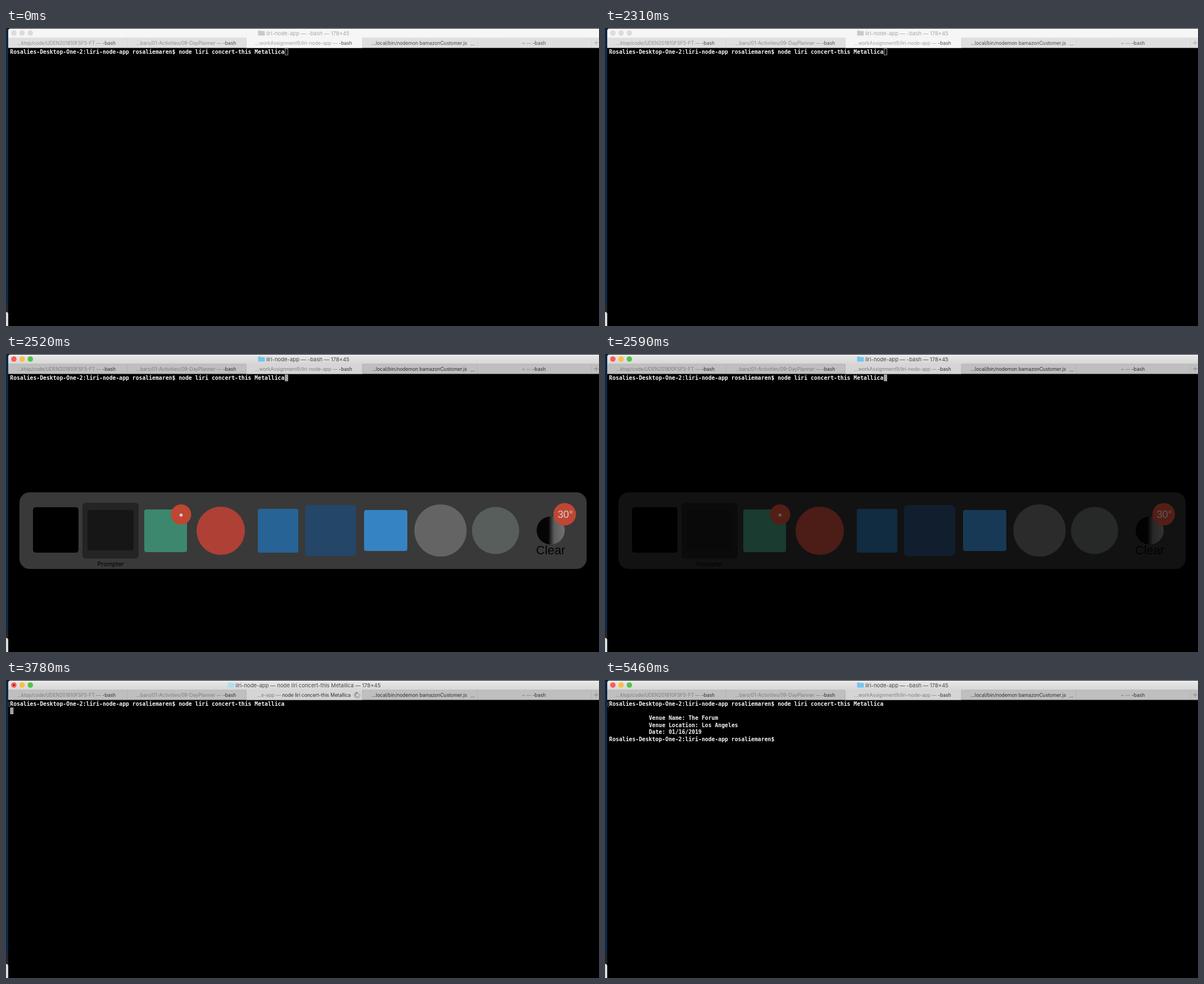
An HTML page for the animation above (5530 ms loop, 1055 by 531 pixels).

```html
<!DOCTYPE html>
<html lang="en">
<head>
<meta charset="utf-8">
<title>Shell session</title>
<style>
html, body { margin: 0; width: 100%; height: 100%; overflow: hidden; background: #000; }
svg { display: block; width: 1055px; height: 531px; }
svg, .panel, .plate, .idle, .typed, .ran, .busy, .calm, .done, .blink, .mark {
  animation: 5530ms step-end infinite;
}

/* window loses grey theme once focused */
svg { animation-name: theme; }
@keyframes theme {
  0%, 100% {
    --top: #f7f7f7; --low: #f5f5f5; --tab: #dfdfdf; --sel: #f6f6f6; --line: #cfcfcf;
    --title: #a6a6a6; --path: #8d8d8d; --dim: #a2a2a2; --name: #4a4a4a;
    --red: #dcdcdc; --amber: #dcdcdc; --green: #dcdcdc; --folder: #c9c9c9;
  }
  45.56% {
    --top: #e9e9e9; --low: #d6d6d6; --tab: #bfbfbf; --sel: #d5d5d5; --line: #a9a9a9;
    --title: #484848; --path: #7c7c7c; --dim: #808080; --name: #2c2c2c;
    --red: #fc5b57; --amber: #fdbd41; --green: #50c546; --folder: #74c5f0;
  }
  67.08% {
    --top: #e9e9e9; --low: #d6d6d6; --tab: #bfbfbf; --sel: #d5d5d5; --line: #a9a9a9;
    --title: #484848; --path: #7c7c7c; --dim: #808080; --name: #2c2c2c;
    --red: #fc5b57; --amber: #fdbd41; --green: #50c546; --folder: #b4dcee;
  }
  73.41% {
    --top: #e9e9e9; --low: #d6d6d6; --tab: #bfbfbf; --sel: #d5d5d5; --line: #a9a9a9;
    --title: #484848; --path: #7c7c7c; --dim: #808080; --name: #2c2c2c;
    --red: #fc5b57; --amber: #fdbd41; --green: #50c546; --folder: #74c5f0;
  }
}

/* app switcher pops in, then fades */
.panel { animation-name: panel; }
@keyframes panel {
  0%, 100% { opacity: 0; }
  44.3% { opacity: 1; }
  45.56% { opacity: .82; }
  46.83% { opacity: .36; }
  48.09% { opacity: .07; }
  49.36% { opacity: 0; }
}
.plate { animation-name: plate; }
@keyframes plate {
  0%, 100% { opacity: 1; }
  45.56% { opacity: .8; }
  46.83% { opacity: .6; }
  48.09% { opacity: 0; }
}

/* shell stages */
.idle { animation-name: idle; }
@keyframes idle { 0% { opacity: 1; } 45.56%, 100% { opacity: 0; } }
.typed { animation-name: typed; }
@keyframes typed { 0%, 100% { opacity: 0; } 45.56% { opacity: 1; } 58.22% { opacity: 0; } }
.ran { animation-name: ran; }
@keyframes ran { 0%, 100% { opacity: 0; } 58.22% { opacity: 1; } 73.41% { opacity: 0; } }
.mark { animation-name: mark; }
@keyframes mark { 0%, 100% { opacity: 0; } 58.22% { opacity: 1; } }
.busy { animation-name: busy; }
@keyframes busy { 0%, 100% { opacity: 0; } 67.08% { opacity: 1; } 73.41% { opacity: 0; } }
.calm { animation-name: calm; }
@keyframes calm { 0%, 100% { opacity: 1; } 67.08% { opacity: 0; } 73.41% { opacity: 1; } }
.done { animation-name: done; }
@keyframes done { 0%, 100% { opacity: 0; } 73.41% { opacity: 1; } }
.blink { animation-name: blink; }
@keyframes blink { 0%, 100% { opacity: 0; } 73.41% { opacity: 1; } 86.07% { opacity: 0; } }

.spin { transform-origin: 625px 27px; animation: spin 921.667ms steps(12) infinite; }
@keyframes spin { to { transform: rotate(360deg); } }

.top { stop-color: var(--top); }
.low { stop-color: var(--low); }
.title { font: 9.5px Inter, "Liberation Sans", sans-serif; fill: var(--title); }
.tabs { font: 8.5px Inter, "Liberation Sans", sans-serif; fill: var(--path); text-anchor: middle; }
.tabs .dim { fill: var(--dim); }
.tabs .name { fill: var(--name); }
.shell { font: bold 9.777px "DejaVu Sans Mono", "Liberation Mono", monospace; fill: #f4f4f4; white-space: pre; }
.folder { fill: var(--folder); }
.cursor { fill: #a3a3a3; }
</style>
</head>
<body>
<svg viewBox="0 0 1055 531">
  <defs>
    <linearGradient id="bar" x2="0" y2="1">
      <stop class="top" offset="0"/><stop class="low" offset="1"/>
    </linearGradient>
    <linearGradient id="moon">
      <stop offset=".42" stop-color="#070707"/><stop offset=".62" stop-color="#707070"/><stop offset="1" stop-color="#8c8c8c"/>
    </linearGradient>
    <path id="dir" class="folder" d="M0 1q0-1 1-1h3l1 1h6q1 0 1 1v6q0 1-1 1h-10q-1 0-1-1z"/>
  </defs>

  <!-- screen edge -->
  <rect width="1055" height="531" fill="#15171c"/>
  <rect y="1" width="4" height="489" fill="#0c2747"/>
  <rect y="490" width="4" height="17" fill="#24252c"/>
  <path d="M0 506q4 0 4 4v21h-4z" fill="#d9dcdc"/>
  <rect x="4" y="35" width="1051" height="496"/>

  <!-- title bar -->
  <path d="M4 18v-13q0-4 4-4h1047v17z" fill="url(#bar)"/>
  <circle cx="14" cy="9" r="4.8" style="fill:var(--red)"/>
  <circle cx="28.6" cy="9" r="4.8" style="fill:var(--amber)"/>
  <circle cx="43.3" cy="9" r="4.8" style="fill:var(--green)"/>
  <circle class="busy" cx="14" cy="9" r="1.6" fill="#7d120f"/>
  <g class="title">
    <g class="calm">
      <use href="#dir" x="448.5" y="4.5"/>
      <text x="463" y="12.6">liri-node-app — -bash — 178×45</text>
    </g>
    <g class="busy">
      <use href="#dir" x="394.5" y="4.5"/>
      <text x="408.5" y="12.6">liri-node-app — node liri concert-this Metallica — 178×45</text>
    </g>
  </g>

  <!-- tabs -->
  <rect x="4" y="18" width="1051" height="17.5" style="fill:var(--tab)"/>
  <rect x="427.5" y="18" width="206.5" height="17.5" style="fill:var(--sel)"/>
  <path d="M4 17.75h423.5M634 17.75h421M215.5 18v17M427.5 18v17M634 18v17M838.5 18v17M1041.5 18v17" fill="none" stroke-width=".6" style="stroke:var(--line)"/>
  <g class="tabs">
    <text x="107.5" y="30">...ktop/code/UDEN201810FSF5-FT — <tspan class="name">-bash</tspan></text>
    <text x="320.5" y="30">...bars/01-Activities/09-DayPlanner — <tspan class="name">-bash</tspan></text>
    <text class="dim calm" x="529.5" y="30">...workAssignment9/liri-node-app — <tspan class="name">-bash</tspan></text>
    <text class="dim busy" x="530" y="30">...e-app — <tspan class="name">node liri concert-this Metallica</tspan></text>
    <text class="name" x="735.5" y="30">...local/bin/nodemon bamazonCustomer.js</text>
    <text class="name" x="830" y="31">...</text>
    <text x="939" y="30">~ — <tspan class="name">-bash</tspan></text>
  </g>
  <path d="M1046 26.5h8M1050 22.5v8" fill="none" stroke-width=".9" style="stroke:var(--dim)"/>
  <g class="busy"><g class="spin" id="spokes" stroke="#555" stroke-width="1" stroke-linecap="round"></g></g>

  <!-- shell -->
  <path class="mark" d="M7 39.5h-1.6v8h1.6" fill="none" stroke="#8a8a8a" stroke-width=".8"/>
  <g class="shell">
    <text x="7.3" y="46.4">Rosalies-Desktop-One-2:liri-node-app rosaliemaren$ node liri concert-this Metallica</text>
    <g class="done">
      <text x="77.9" y="71.4">Venue Name: The Forum</text>
      <text x="77.9" y="83.9">Venue Location: Los Angeles</text>
      <text x="77.9" y="96.4">Date: 01/16/2019</text>
      <text x="7.3" y="108.9">Rosalies-Desktop-One-2:liri-node-app rosaliemaren$</text>
    </g>
  </g>
  <rect class="idle" x="496.5" y="37" width="5" height="11" fill="none" stroke="#b0b0b0" stroke-width=".9"/>
  <rect class="cursor typed" x="496" y="36.5" width="6" height="12"/>
  <rect class="cursor ran" x="7.3" y="49" width="6" height="12"/>
  <rect class="cursor blink" x="307.5" y="99.5" width="6" height="12"/>

  <!-- app switcher -->
  <g class="panel">
    <g class="plate">
      <rect x="24" y="246.5" width="1009" height="136.5" rx="18" fill="#585858"/>
      <rect x="136" y="265" width="100" height="99.5" rx="6" fill="#373737"/>
    </g>
    <rect x="48" y="273" width="81" height="81" rx="5"/>
    <rect x="145" y="278" width="82" height="72" rx="4" fill="#1b1b1b"/>
    <rect x="246" y="277" width="76" height="76" rx="4" fill="#4ba587"/>
    <circle cx="382" cy="315" r="43" fill="#d54f42"/>
    <rect x="448" y="276" width="72" height="78" rx="3" fill="#3179b6"/>
    <rect x="532" y="269" width="91" height="91" rx="7" fill="#2d5680"/>
    <rect x="637" y="278" width="77" height="73" rx="4" fill="#43a0ee"/>
    <circle cx="773" cy="314.5" r="46.5" fill="#7a7a7a"/>
    <circle cx="871" cy="314.5" r="42" fill="#6c736f"/>
    <circle cx="969" cy="314.5" r="25" fill="url(#moon)"/>
    <circle cx="311.5" cy="286" r="18" fill="#ea563e"/>
    <circle cx="311.5" cy="287" r="2.8" fill="#fff"/>
    <circle cx="994" cy="285.5" r="20" fill="#ea563e"/>
    <g text-anchor="middle" font-family="Liberation Sans, sans-serif">
      <text x="995" y="292" font-size="18" fill="#fff">30°</text>
      <text x="969" y="357" font-size="21.8" fill="#060606">Clear</text>
      <text x="186" y="378" font-size="10.8" font-family="Inter, sans-serif">Prompter</text>
    </g>
  </g>
</svg>
<script>
const spokes = document.getElementById("spokes");
for (let i = 0; i < 12; i++) {
  const line = document.createElementNS("http://www.w3.org/2000/svg", "path");
  line.setAttribute("d", "M625 24v-2.6");
  line.setAttribute("transform", `rotate(${i * 30} 625 27)`);
  line.setAttribute("opacity", 0.25 + 0.75 * i / 11);
  spokes.append(line);
}
</script>
</body>
</html>
```
